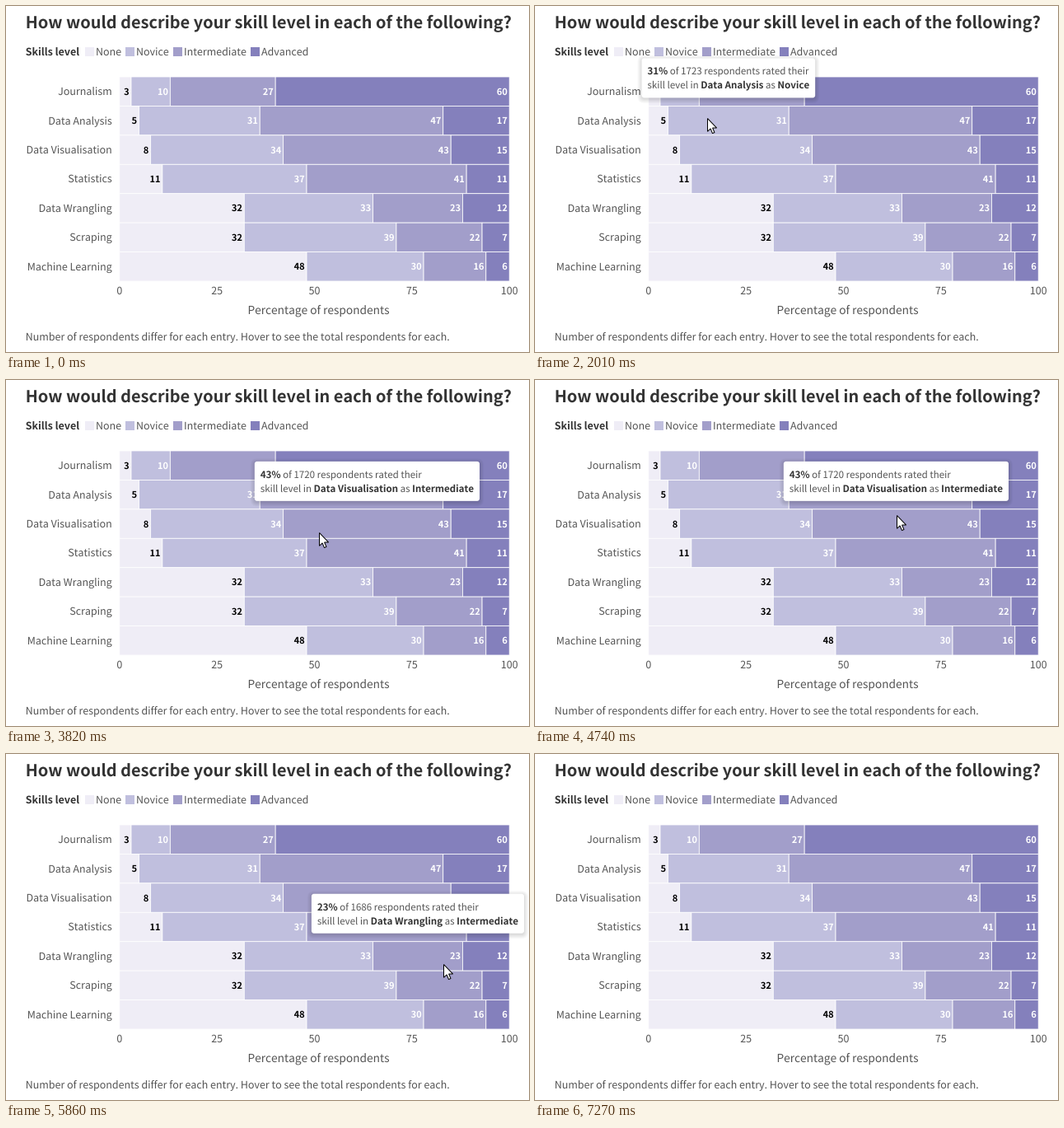
Recreate the animation shown at these times as a matplotlib script. Size 635 by 420 pixels, loop 7870 ms.

```python
import matplotlib.pyplot as plt
import numpy as np
from matplotlib.animation import FuncAnimation
from matplotlib.patches import FancyBboxPatch, PathPatch, Polygon, Rectangle
from matplotlib.textpath import TextPath
from matplotlib.transforms import Affine2D

FONT = "Noto Sans CJK JP"
W, H, DPI = 635, 420, 100
PT = 72 / DPI
LOOP, STEP = 7870, 10

BODY, TIP_SIZE, MARGIN = 12.46, 11.53, 23.7
INK, GREY = "#333333", "#555555"
LEVELS = ["None", "Novice", "Intermediate", "Advanced"]
COLORS = ["#efedf6", "#c0bfde", "#a29eca", "#8480bc"]

# skill, respondents, percentage per level
SKILLS = [
    ("Journalism", 1738, (3, 10, 27, 60)),
    ("Data Analysis", 1723, (5, 31, 47, 17)),
    ("Data Visualisation", 1720, (8, 34, 43, 15)),
    ("Statistics", 1702, (11, 37, 41, 11)),
    ("Data Wrangling", 1686, (32, 33, 23, 12)),
    ("Scraping", 1679, (32, 39, 22, 7)),
    ("Machine Learning", 1671, (48, 30, 16, 6)),
]
LEFT, RIGHT, TOP, PITCH = 137.8, 611.2, 86, 35.43

# Pointer legs: start and end time, where it comes to rest, ease-out power.
# It enters from below the stage and leaves there again.
ENTRY = (-51, 485)
LEGS = [
    (390, 1110, (141, 94), 2),
    (1710, 2010, (209, 136), 2),
    (2820, 3020, (262, 181), 2),
    (3620, 4040, (403, 186), 2),
    (4340, 4840, (446, 160), 1),
    (5040, 5460, (513.5, 223), 1.25),
    (5760, 6060, (544, 278), 1.25),
    (6870, 7270, (591, 425), 1),
]

fig = plt.figure(figsize=(W / DPI, H / DPI), dpi=DPI, facecolor="white")


def pixel_axes():
    ax = fig.add_axes([0, 0, 1, 1])
    ax.set(xlim=(0, W), ylim=(H, 0))
    ax.axis("off")
    return ax


def outline(s, size, weight):
    return TextPath((0, 0), s, size=size, prop={"family": FONT, "weight": weight})


def advance(s, size=BODY, weight="normal"):
    """Pen advance of a string, counting its outer spaces."""
    ink = lambda t: outline(t, size, weight).get_extents().width
    return ink(f"|{s}|") - ink("||")


def write(ax, x, y, s, size=BODY, color=GREY, weight="normal", align=0, zorder=1):
    """Put text on baseline y; align 0, 0.5 or 1 is left, centre or right."""
    x -= align * advance(s, size, weight)
    place = Affine2D().scale(1, -1).translate(x, round(y)) + ax.transData
    return ax.add_patch(PathPatch(outline(s, size, weight), fc=color, lw=0,
                                  transform=place, zorder=zorder))


def x_at(percent):
    return LEFT + (RIGHT - LEFT) * percent / 100


def draw_legend(ax):
    write(ax, MARGIN, 60, "Skills level", color=INK, weight="bold")
    x = 96
    for name, color in zip(LEVELS, COLORS):
        ax.add_patch(Rectangle((x, 50), 11, 11, fc=color, lw=0))
        write(ax, x + 13, 60, name)
        x = round(x + 18 + advance(name))


def draw_chart(ax):
    write(ax, MARGIN, 27, "How would describe your skill level in each of the following?",
          19.95, INK, "bold")
    draw_legend(ax)
    for row, (skill, _, shares) in enumerate(SKILLS):
        y = TOP + row * PITCH
        mid = y + PITCH / 2
        write(ax, 128.7, mid + 4.4, skill, align=1)
        ends = np.cumsum(shares)
        for level, (share, end) in enumerate(zip(shares, ends)):
            x0, x1 = x_at(end - share), x_at(end)
            ax.add_patch(Rectangle((x0, y), x1 - x0, PITCH, fc=COLORS[level],
                                   ec="white", lw=0.8 * PT, snap=False))
            write(ax, x1 - 2.4, mid + 4, str(share), 11,
                  "white" if level else "black", "bold", align=1, zorder=2)

    for tick in range(0, 101, 25):
        write(ax, x_at(tick), 350, str(tick), align=0.5)
    write(ax, 379.5, 374, "Percentage of respondents", 13.7, align=0.5)
    write(ax, MARGIN, 406, "Number of respondents differ for each entry. "
          "Hover to see the total respondents for each.")


def rounded(ax, x, y, w, h, radius, **kw):
    style = f"round,pad=0,rounding_size={radius}"
    return ax.add_patch(FancyBboxPatch((x, y), w, h, boxstyle=style, lw=0, **kw))


def make_tooltip(ax, row, level):
    skill, total, shares = SKILLS[row]
    lines = [
        [(f"{shares[level]}%", "bold"), (f" of {total} respondents rated their", "normal")],
        [("skill level in ", "normal"), (skill, "bold"), (" as ", "normal"),
         (LEVELS[level], "bold")],
    ]
    widths = [[advance(s, TIP_SIZE, wt) for s, wt in line] for line in lines]
    w, h, gap = max(map(sum, widths)) + 14, 48, 10

    center = x_at(sum(shares[:level]) + shares[level] / 2)
    anchor = TOP + row * PITCH
    if center + w / 2 > W - 3:  # no room above: sit to the left of the anchor
        x, y = center - gap - w, anchor - h / 2
    else:
        x, y = center - w / 2, anchor - gap - h

    parts = [rounded(ax, x - g, y - g + 1.5, w + 2 * g, h + 2 * g, 3 + g,
                     fc="black", alpha=0.022, zorder=3) for g in range(6)]
    parts.append(rounded(ax, x, y, w, h, 3, fc="white", zorder=4))
    for line, steps, base in zip(lines, widths, (20, 37)):
        pen = x + 7
        for (s, weight), step in zip(line, steps):
            color = INK if weight == "bold" else GREY
            parts.append(write(ax, pen, y + base, s, TIP_SIZE, color, weight, zorder=5))
            pen += step
    return parts


def bar_under(x, y):
    """Row and level of the bar below a point, or None."""
    row = int((y - TOP) // PITCH)
    if not (LEFT <= x < RIGHT and 0 <= row < len(SKILLS)):
        return None
    percent = 100 * (x - LEFT) / (RIGHT - LEFT)
    return row, int(np.searchsorted(np.cumsum(SKILLS[row][2]), percent))


def make_timeline():
    """Poses as (time, point, hovered bar); a tooltip needs two steps on one bar."""
    poses, here, last_bar = [(0, np.array(ENTRY), None)], np.array(ENTRY), None
    for begin, end, rest, power in LEGS:
        count = (end - begin) // 100 + 1
        for k in range(1, count + 1):
            time = end if k == count else begin + 100 * (k - 1)
            eased = 1 - (1 - k / count) ** power
            point = here + (np.array(rest) - here) * eased
            bar = bar_under(*point)
            poses.append((time, point, bar if bar == last_bar else None))
            last_bar = bar
        here = np.array(rest)
    return poses


# The chart never changes, so it is rendered once and reused as a backdrop.
chart = pixel_axes()
draw_chart(chart)
fig.canvas.draw()
backdrop = np.array(fig.canvas.buffer_rgba())
chart.remove()
fig.figimage(backdrop, zorder=-1)

stage = pixel_axes()
timeline = make_timeline()
tooltips = {bar: make_tooltip(stage, *bar)
            for bar in sorted({bar for _, _, bar in timeline if bar})}

ARROW = np.array([(0.5, 0.5), (0.5, 16.3), (4.1, 12.9), (6.5, 18.6),
                  (9, 17.5), (6.6, 12), (11.6, 12)])
pointer = stage.add_patch(Polygon(ARROW, fc="white", ec="black", lw=PT,
                                  joinstyle="miter", zorder=6))


def update(i):
    _, point, hovered = [pose for pose in timeline if pose[0] <= i * STEP][-1]
    pointer.set_xy(ARROW + np.round(point))
    for bar, parts in tooltips.items():
        for part in parts:
            part.set_visible(bar == hovered)
    return [pointer]


anim = FuncAnimation(fig, update, frames=LOOP // STEP, interval=STEP,
                     repeat=True, repeat_delay=0, cache_frame_data=False)
plt.show()
```
